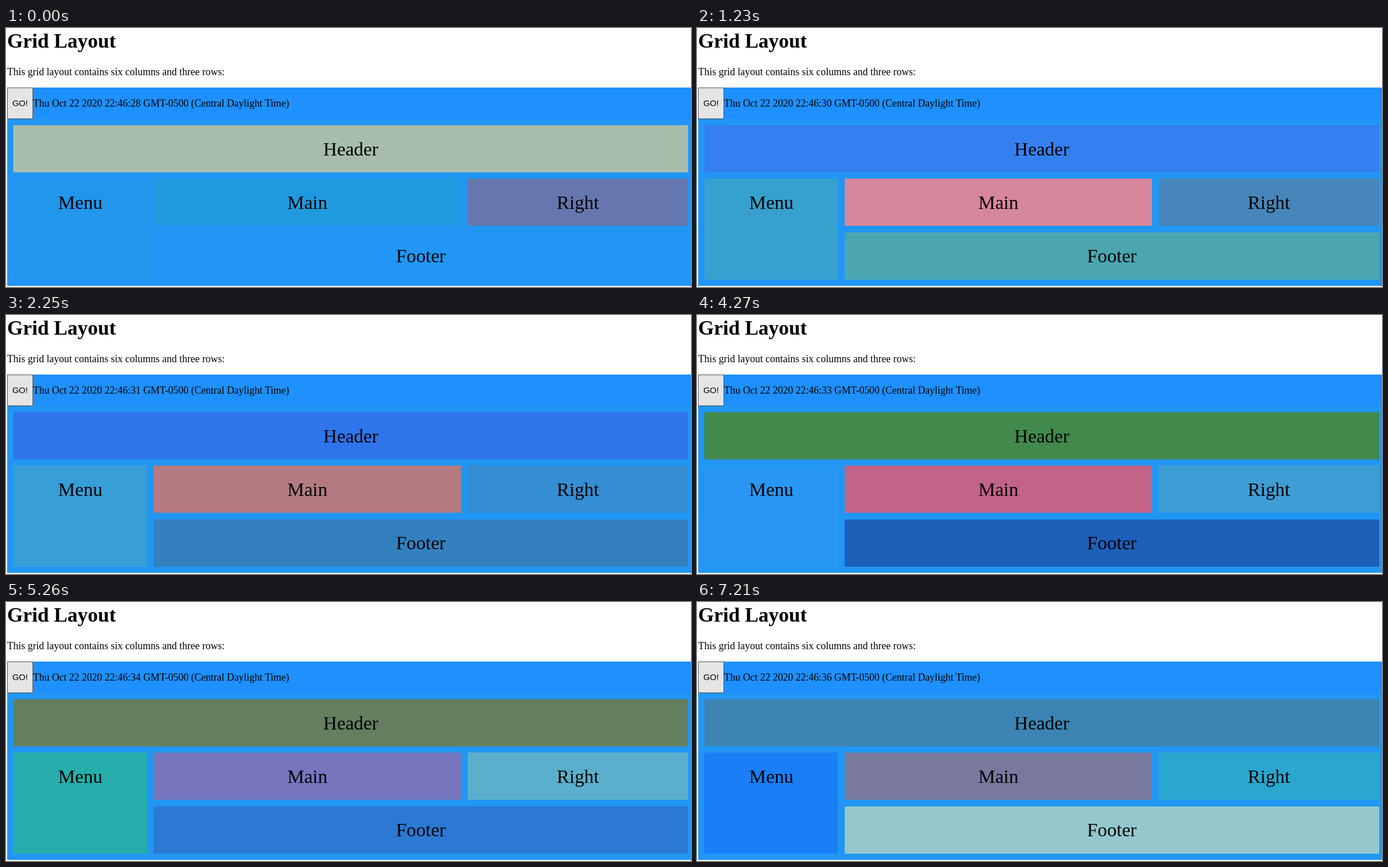
An HTML page that plays this animation: 1215x461 px, repeating every 8000 ms.

```html
<!DOCTYPE html>
<html lang="en">
<head>
<meta charset="utf-8">
<title>Grid Layout</title>
<style>
  html, body { margin: 0; width: 100%; height: 100%; overflow: hidden; background: #fff; }
  svg { display: block; width: 1215px; height: 461px; font: 18px "Liberation Serif", "Times New Roman", serif; }
  h1, .title { font-size: 36px; font-weight: bold; }
  .button { font: 15px "Liberation Sans", Arial, sans-serif; }
  .label { font-size: 33.75px; text-anchor: middle; }
</style>
</head>
<body>
<svg viewBox="0 0 1215 461">
  <text class="title" x="2" y="35">Grid Layout</text>
  <text x="2" y="84">This grid layout contains six columns and three rows:</text>
  <rect x="2" y="106" width="1213" height="56" fill="#1e90ff"/>
  <rect x="2.5" y="106.5" width="45" height="55" fill="#e5e5e5" stroke="#4f4f4f"/>
  <text class="button" x="11.2" y="139">GO!</text>
  <text id="clock" x="48" y="140"></text>
  <rect x="2" y="162" width="1213" height="297" fill="#2196f3"/>
  <g id="grid"></g>
</svg>
<script>
  const LOOP = 8000;
  const FIRST_SECOND = 28;

  // name, left, top, right, bottom, text centre, text baseline
  const areas = [
    ["Header", 13, 173, 1210, 257, 611.5, 227],
    ["Menu", 13, 268, 250, 448, 131.8, 322],
    ["Main", 262, 268, 807, 352, 534.5, 322],
    ["Right", 819, 268, 1210, 352, 1014.3, 322],
    ["Footer", 262, 364, 1210, 448, 735.8, 417]
  ];

  // start time, then one colour per area
  const ticks = [
    [0, "#a8bdab", "#2196eb", "#1f9adf", "#6577ae", "#2196f7"],
    [300, "#5b8fd0", "#2f9bdc", "#7b90bd", "#4f88bb", "#3a9fd0"],
    [1230, "#3580f0", "#36a0ce", "#d7879b", "#4686ba", "#4ca6b0"],
    [2250, "#2f74eb", "#379ed7", "#b37b7f", "#358dd3", "#3480bf"],
    [3240, "#2967e6", "#379ce0", "#906e62", "#2493ec", "#1b5bce"],
    [4270, "#42894c", "#2896f3", "#c26387", "#3e9dd4", "#1e5fb9"],
    [5260, "#637f5e", "#25aeab", "#7574bd", "#5bafcd", "#2c79d3"],
    [6200, "#84756f", "#22c663", "#2884f3", "#78c1c5", "#3a93ec"],
    [7210, "#3c84b3", "#1a7ff7", "#78799d", "#2ba6cf", "#94c8cd"]
  ];

  const grid = document.getElementById("grid");
  const clock = document.getElementById("clock");

  function add(tag, attrs, text = "") {
    const el = document.createElementNS(grid.namespaceURI, tag);
    for (const key in attrs) el.setAttribute(key, attrs[key]);
    el.textContent = text;
    return grid.appendChild(el);
  }

  const boxes = areas.map(([name, x, y, right, bottom, cx, base]) => {
    const box = add("rect", { x, y, width: right - x, height: bottom - y });
    add("text", { class: "label", x: cx, y: base }, name);
    return box;
  });

  let shown = -1;

  function draw() {
    const time = performance.now() % LOOP;
    const index = ticks.filter(tick => tick[0] <= time).length - 1;
    if (index !== shown) {
      shown = index;
      boxes.forEach((box, i) => box.setAttribute("fill", ticks[index][i + 1]));
      clock.textContent =
        `Thu Oct 22 2020 22:46:${FIRST_SECOND + index} GMT-0500 (Central Daylight Time)`;
    }
    requestAnimationFrame(draw);
  }
  draw();
</script>
</body>
</html>
```
